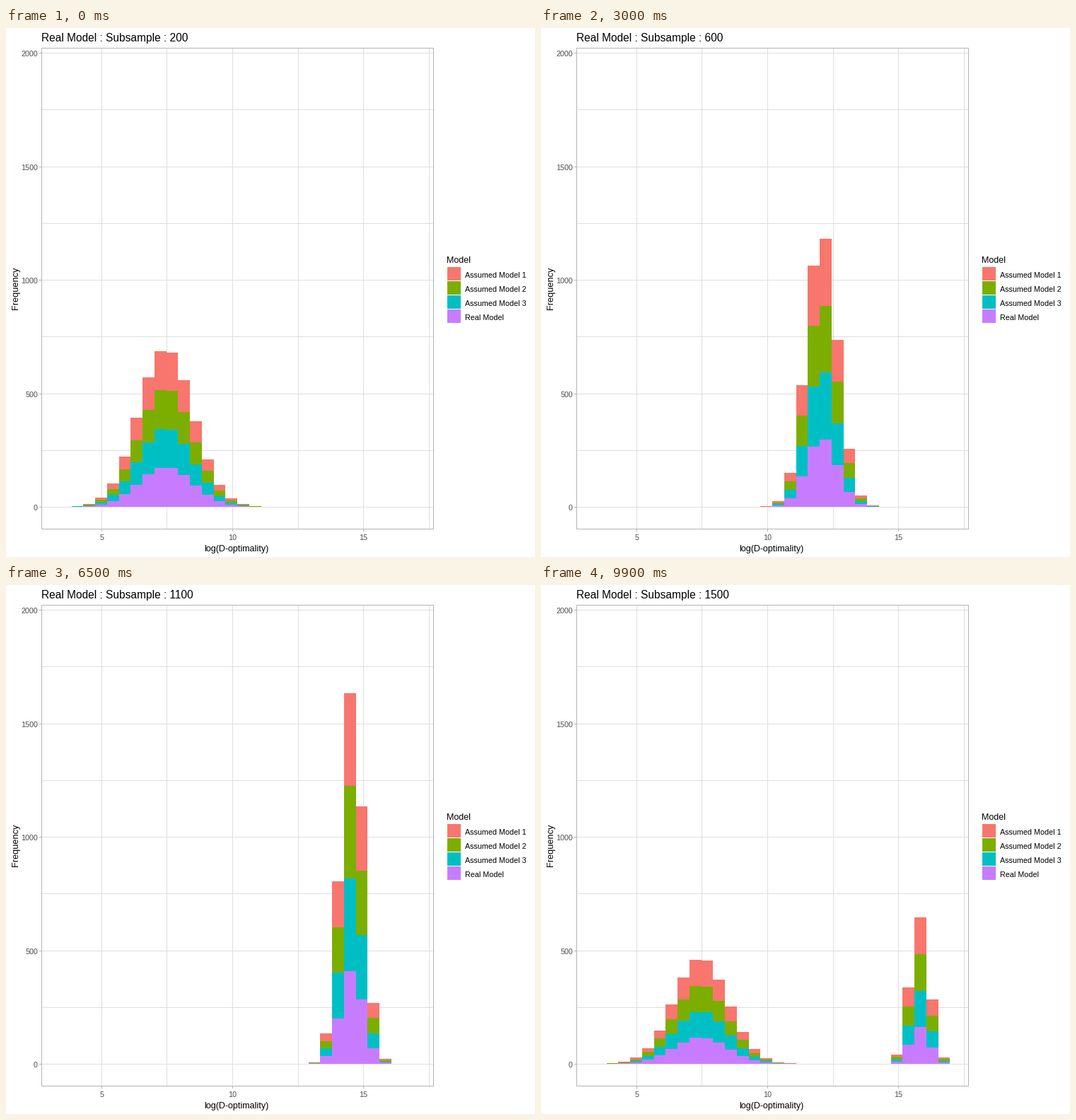
Write a matplotlib script that moves like this. It is 748 by 748 pixels and loops after 10000 ms.

```python
import math

import numpy as np
import matplotlib.pyplot as plt
from matplotlib.animation import FuncAnimation
from matplotlib.patches import Rectangle

SIZE = 748
FRAMES, INTERVAL = 100, 100
PT = 0.72  # points per pixel at 100 dpi

BINS = 29
POPULATION, DRAWS = 10000, 4000
EDGES = np.round(92.6 + 16.755 * np.arange(BINS + 1))
BASE, SCALE = 677, 0.321

LAYERS = [("Assumed Model 1", "#F8766D"), ("Assumed Model 2", "#7CAE00"),
          ("Assumed Model 3", "#00BFC4"), ("Real Model", "#C77CFF")]
GRID, BORDER, TICK = "#DEDEDE", "#B3B3B3", "#4D4D4D"
L, R, T, B = 50.5, 604.5, 28.5, 708.5


def histogram(n):
    """Expected counts per bin for subsamples of size n.

    The centre follows log n; the spread has a finite population correction.
    """
    mean = 8.85 * math.log(n) - 38.18 - 150 / n
    sd = math.sqrt(1045 * (1 / n - 1 / POPULATION))
    cdf = [0.5 * (1 + math.erf((k - mean) / (sd * math.sqrt(2))))
           for k in range(BINS + 1)]
    return DRAWS * np.diff(cdf)


sizes = range(200, 1501, 100)
states = [histogram(n) for n in sizes]

# the first three transitions take four frames, the others three
steps = [4 if i < 3 else 3 for i in range(len(states))]
arrive = np.cumsum([0] + [4 + s - (i == 0 or i > 2)
                          for i, s in enumerate(steps)])
arrive[3:] = 23 + 7 * np.arange(len(arrive) - 3)


def heights(frame):
    i = int(np.searchsorted(arrive, frame, side="right")) - 1
    t = max(0, frame - arrive[i + 1] + steps[i]) / steps[i]
    a, b = states[i], states[(i + 1) % len(states)]
    return sizes[i], a + (b - a) * t


plt.rcParams["font.family"] = "Liberation Sans"
fig = plt.figure(figsize=(7.48, 7.48), dpi=100, facecolor="white")
ax = fig.add_axes([0, 0, 1, 1])
ax.set_xlim(0, SIZE)
ax.set_ylim(SIZE, 0)
ax.axis("off")


def line(x, y, color, z):
    ax.plot(x, y, color=color, lw=PT, zorder=z, snap=False,
            solid_capstyle="butt")


def box(x, y, w, h, color, z=3):
    return ax.add_patch(Rectangle((x, y), w, h, fc=color, lw=0,
                                  antialiased=False, zorder=z))


def label(x, y, s, px, color="black", **kw):
    return ax.text(x, y, s, fontsize=px * PT, color=color,
                   va="baseline", **kw)


def pixel(v):
    return math.floor(v) + 0.5


# grid, axes and tick labels: every second line is a labelled major one
for i in range(6):
    x = pixel(135.2 + 92.65 * i)
    line([x, x], [T, B], GRID, 1)
    if i % 2 == 0:
        line([x, x], [B, B + 3.5], BORDER, 4)
        label(x, 724, str(5 + 5 * i // 2), 10.8, TICK, ha="center")
for i in range(9):
    y = pixel(677.5 - 80.25 * i)
    line([L, R], [y, y], GRID, 1)
    if i % 2 == 0:
        line([L - 3.5, L], [y, y], BORDER, 4)
        label(45, y + 4.5, str(250 * i), 10.8, TICK, ha="right")
ax.add_patch(Rectangle((L, T), R - L, B - T, fill=False, ec=BORDER,
                       lw=PT, zorder=4, snap=False))

title = label(50, 19, "", 15.5)
label(325.5, 740, "log(D-optimality)", 12.5, ha="center")
label(17, 368, "Frequency", 12.7, ha="center", rotation=90,
      rotation_mode="anchor")
label(623, 332, "Model", 12.5)
for i, (name, color) in enumerate(LAYERS):
    box(624, 338 + 20 * i, 19, 19, color)
    label(649, 353 + 20 * i, name, 10.75)

# painted from the back: the whole stack first, the lowest layer last
bars = [[box(EDGES[k], BASE, EDGES[k + 1] - EDGES[k], 0, color, 3 + j / 10)
         for k in range(BINS)] for j, (_, color) in enumerate(LAYERS)]


def update(frame):
    n, counts = heights(frame)
    title.set_text(f"Real Model : Subsample : {n}")
    for j, row in enumerate(bars):
        share = 1 - j / len(LAYERS)
        for bar, count in zip(row, counts):
            bar.set_height(-round(count * share * SCALE))
    return [title]


anim = FuncAnimation(fig, update, frames=FRAMES, interval=INTERVAL,
                     repeat=True, repeat_delay=0)
plt.show()
```
